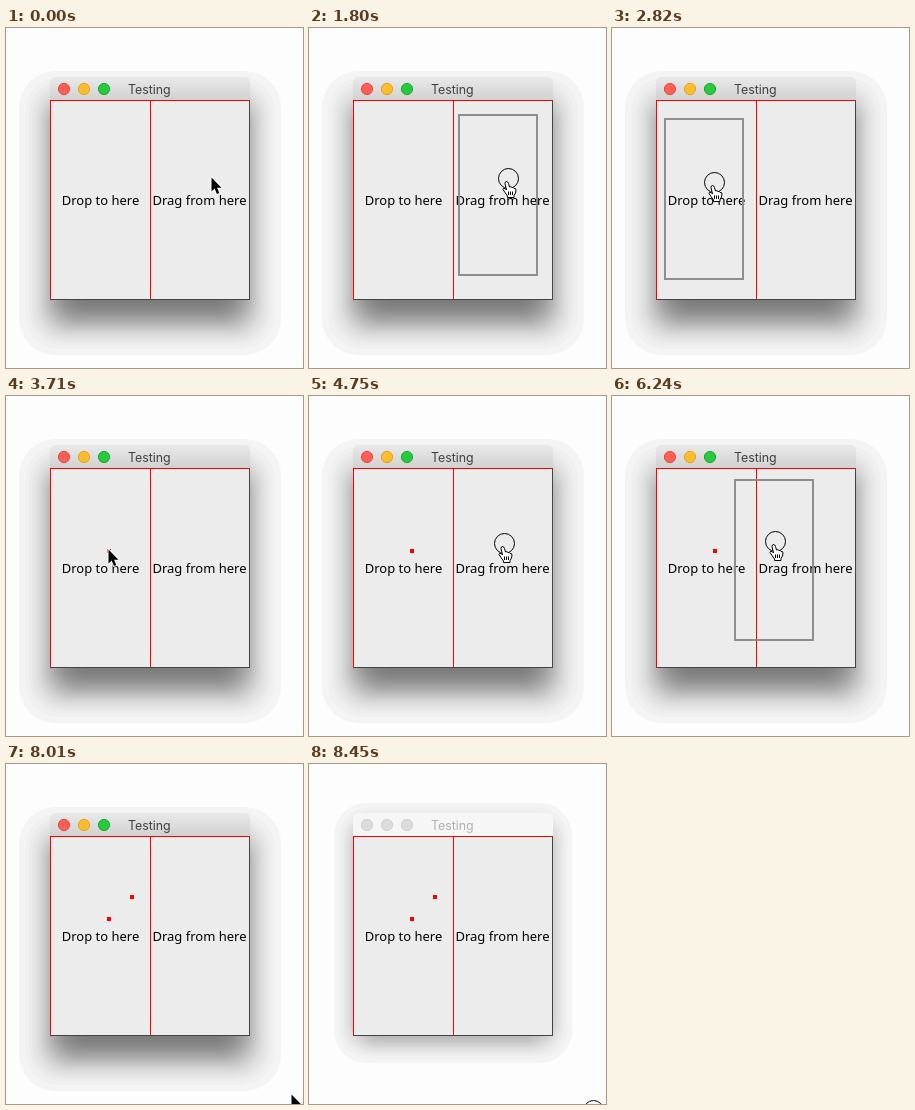
An HTML page with a canvas for the animation above (8500 ms loop, 297 by 340 pixels).

```html
<!DOCTYPE html>
<html lang="en">
<head>
<meta charset="utf-8">
<title>Drag and drop</title>
<style>
html, body { margin: 0; width: 100%; height: 100%; overflow: hidden; background: #fdfdfd; }
canvas { display: block; }
</style>
</head>
<body>
<canvas width="297" height="340"></canvas>
<script>
const ctx = document.querySelector('canvas').getContext('2d');
const LOOP = 8500;

// Each phase: start time, cursor kind, optional drag offset, and the pointer
// path as [step, x, y] keys; stepped phases also give the time of the last step.
const phases = [
  { at: 0, cursor: 'arrow', path: [[0, 206, 149]] },
  { at: 750, cursor: 'hand', path: [[0, 206, 149]] },
  { at: 1800, end: 2820, cursor: 'hand', grab: [50, 64],
    path: [[0, 199, 150], [2, 164, 151], [4, 134, 152], [7, 102, 154]] },
  { at: 3270, cursor: 'arrow', path: [[0, 102, 154]] },
  { at: 3710, end: 4450, cursor: 'arrow',
    path: [[0, 103, 153], [1, 115, 151], [4, 186, 148], [5, 195, 147]] },
  { at: 4750, cursor: 'hand', path: [[0, 195, 147]] },
  { at: 5790, end: 6820, cursor: 'hand', grab: [41, 62],
    path: [[0, 181, 147], [3, 163, 145], [5, 142, 137], [7, 125, 131]] },
  { at: 7270, cursor: 'arrow', path: [[0, 125, 131]] },
  { at: 7720, end: 8150, cursor: 'arrow',
    path: [[0, 131, 139], [1, 195, 222], [2, 286, 330], [3, 284, 346]] },
  { at: 8450, cursor: 'hand', path: [[0, 284, 346]] },
];
const drops = [[3270, 101, 153], [7270, 124, 131]];

const arrowShape = new Path2D('M0 0V14L3.2 11L5.4 16.4L7.8 15.4L5.6 10.2H10Z');
const handShape = new Path2D(
  'M-1.5 12L-3 5.5Q-3 3.5 -1.5 3.5Q0 3.5 .5 5.5L1.5 9Q3 8 4 9.5Q5.5 9 6 10.5Q8 10 8 12' +
  'L7.5 15L6 17.5V19.5H-.5V18L-3 14.5L-5 11.5Q-5 9.5 -3 10.5L-1.5 12Z');
const handLines = new Path2D('M.5 13.5V17M2.5 13.5V17M4.5 13.5V17');

function pointerAt({ at, end, path }, time) {
  const last = path[path.length - 1];
  if (!end || time >= end) return last.slice(1);
  const step = Math.floor((time - at) / (end - at) * last[0] + 0.02);
  const i = Math.max(1, path.findIndex(key => key[0] >= step));
  const [a, b] = [path[i - 1], path[i]];
  const u = (step - a[0]) / (b[0] - a[0]);
  return [1, 2].map(k => Math.round(a[k] + (b[k] - a[k]) * u));
}

function roundRect(x, y, w, h, radius, fill) {
  ctx.beginPath();
  ctx.roundRect(x, y, w, h, radius);
  ctx.fillStyle = fill;
  ctx.fill();
}

function text(str, x, y, font, color) {
  ctx.font = font;
  ctx.textAlign = 'center';
  ctx.fillStyle = color;
  ctx.fillText(str, x, y);
}

// Soft shadow as nested contours of a blurred rectangle.
function drawShadow(strength, softness, drop) {
  for (let v = 0.02; v < strength * 0.95; v += 0.017) {
    const d = softness * Math.log(strength / v - 1);
    const grey = Math.round(253 * (1 - v - 0.014));
    roundRect(44 - d, 49 + drop - d, 200 + 2 * d, 222 + 2 * d, Math.max(12, 26 + d / 3),
      `rgb(${grey},${grey},${grey})`);
  }
}

function drawWindow(active) {
  if (active) drawShadow(0.55, 9.45, 25);
  else drawShadow(0.35, 6.8, 9);

  let bar = '#f6f6f6';
  if (active) {
    bar = ctx.createLinearGradient(0, 49, 0, 72);
    bar.addColorStop(0, '#e9e9e9');
    bar.addColorStop(1, '#d1d1d1');
  }
  roundRect(44, 49, 200, 23, [5, 5, 0, 0], bar);
  const lights = active ? ['#ff5f57', '#ffbd2e', '#28c93f'] : Array(3).fill('#dcdcdc');
  const rims = active ? ['#e2463f', '#e1a116', '#12ac28'] : Array(3).fill('#d0d0d0');
  lights.forEach((color, i) => {
    circle(58 + 20 * i, 61, 5.6, color, rims[i]);
  });
  text('Testing', 143.3, 66, '12.4px Inter, sans-serif', active ? '#404040' : '#b0b0b0');

  ctx.fillStyle = '#ececec';
  ctx.fillRect(44, 72, 200, 200);
  ctx.fillStyle = '#444';
  ctx.fillRect(243, 72, 1, 200);
  ctx.fillRect(44, 271, 200, 1);
  ctx.fillStyle = '#f00';
  ctx.fillRect(44, 72, 200, 1);
  ctx.fillRect(44, 72, 1, 200);
  ctx.fillRect(144, 72, 1, 199);
  const font = '13px "Noto Sans", sans-serif';
  text('Drop to here', 94.5, 177, font, '#000');
  text('Drag from here', 193.5, 177, font, '#000');
}

function circle(x, y, r, fill, stroke) {
  ctx.beginPath();
  ctx.arc(x, y, r, 0, 2 * Math.PI);
  if (fill) {
    ctx.fillStyle = fill;
    ctx.fill();
  }
  ctx.strokeStyle = stroke;
  ctx.lineWidth = 1;
  ctx.stroke();
}

function drawCursor(kind, x, y) {
  ctx.save();
  ctx.lineJoin = 'round';
  if (kind === 'arrow') {
    ctx.translate(x - 0.5, y + 0.5);
    ctx.strokeStyle = '#fff';
    ctx.lineWidth = 2;
    ctx.stroke(arrowShape);
    ctx.fillStyle = '#000';
    ctx.fill(arrowShape);
  } else {
    circle(x + 0.5, y + 0.5, 10, null, '#000');
    ctx.translate(x, y);
    ctx.fillStyle = '#fff';
    ctx.fill(handShape);
    ctx.stroke(handShape);
    ctx.stroke(handLines);
  }
  ctx.restore();
}

function draw(time) {
  const phase = phases.findLast(p => p.at <= time);
  const [x, y] = pointerAt(phase, time);
  ctx.fillStyle = '#fdfdfd';
  ctx.fillRect(0, 0, 297, 340);
  drawWindow(time < 8450);

  ctx.fillStyle = '#f00';
  for (const [at, left, top] of drops) {
    if (time >= at) ctx.fillRect(left, top, 4, 4);
  }
  if (phase.grab) {
    ctx.strokeStyle = '#8e8e8e';
    ctx.lineWidth = 2;
    ctx.strokeRect(x - phase.grab[0] + 1, y - phase.grab[1] + 1, 78, 160);
  }
  drawCursor(phase.cursor, x, y);
}

const start = performance.now();
function tick() {
  draw((performance.now() - start) % LOOP);
  requestAnimationFrame(tick);
}
tick();
</script>
</body>
</html>
```
